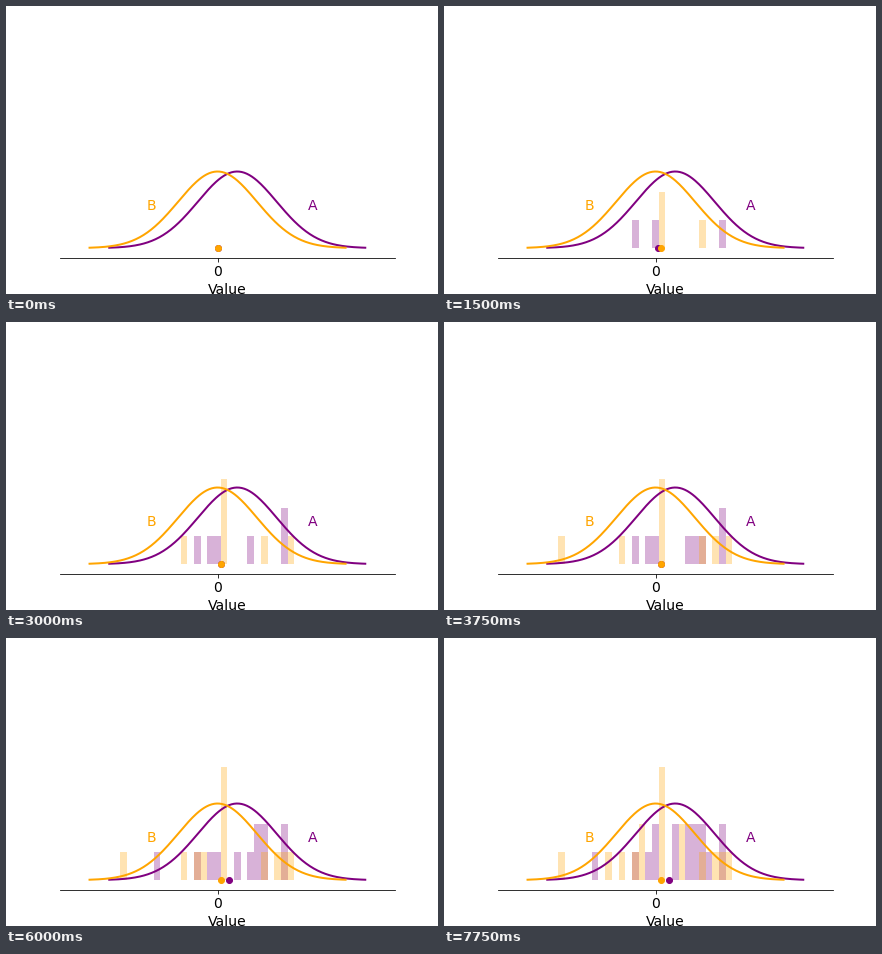
A matplotlib script for the animation above (8000 ms loop, 432x288 px).

```python
import numpy as np
import matplotlib.pyplot as plt
from matplotlib.animation import FuncAnimation

plt.rcParams.update({"font.family": "DejaVu Sans", "font.size": 14})

N_FRAMES, INTERVAL = 32, 250
X_MIN, X_MAX, N_BINS = -4.0, 4.5, 50
N_SCALE, Y_TOP, STEP = 40, 7, 0.05

edges = np.linspace(X_MIN, X_MAX, N_BINS + 1)
width = edges[1] - edges[0]
centers = edges[:-1] + width / 2

# Bin of each sample, in drawing order.
GROUPS = {
    "A": dict(color="purple", mean=0.5, label_x=2.3,
              bins=[20, 23, 33, 22, 33, 28, 29, 30,
                    26, 30, 29, 14, 23, 28, 26, 31]),
    "B": dict(color="orange", mean=0.0, label_x=-1.8,
              bins=[24, 30, 24, 34, 24, 18, 32, 9,
                    33, 21, 20, 24, 16, 27, 27, 21]),
}


def estimates(bins):
    """Estimate after each sample: a fixed step towards it."""
    path = [0.0]
    for b in bins:
        path.append(path[-1] + STEP * np.sign(centers[b] - path[-1]))
    return path


fig, ax = plt.subplots(figsize=(6, 4), dpi=72)
fig.subplots_adjust(left=0.125, right=0.9, bottom=0.125, top=0.88)
ax.set_xlim(X_MIN, X_MAX)
ax.set_ylim(-0.05 * Y_TOP, 1.05 * Y_TOP)
ax.spines[["left", "top", "right"]].set_visible(False)
ax.set_yticks([])
ax.set_xticks([0], ["0"])
ax.set_xlabel("Value")

peak = N_SCALE * width / np.sqrt(2 * np.pi)
z = np.linspace(-3.25, 3.25, 200)

for name, g in GROUPS.items():
    color = g["color"]
    g["bars"] = ax.bar(centers, np.zeros(N_BINS), width, color=color,
                       alpha=0.3, linewidth=0)
    ax.plot(z + g["mean"], peak * np.exp(-z**2 / 2), color=color, lw=2)
    ax.text(g["label_x"], peak / 2, name, color=color)
    g["dot"], = ax.plot([0], [0], "o", color=color, ms=6, zorder=3)
    g["path"] = estimates(g["bins"])


def update(frame):
    # Samples land on odd frames, estimates follow on even ones.
    seen, learned = (frame + 1) // 2, frame // 2
    artists = []
    for g in GROUPS.values():
        counts = np.bincount(g["bins"][:seen], minlength=N_BINS) if seen else np.zeros(N_BINS)
        for bar, count in zip(g["bars"], counts):
            bar.set_height(count)
            bar.set_visible(count > 0)
        g["dot"].set_xdata([g["path"][learned]])
        artists += [*g["bars"], g["dot"]]
    return artists


anim = FuncAnimation(fig, update, frames=N_FRAMES, interval=INTERVAL,
                     repeat=True, blit=False)
plt.show()
```
